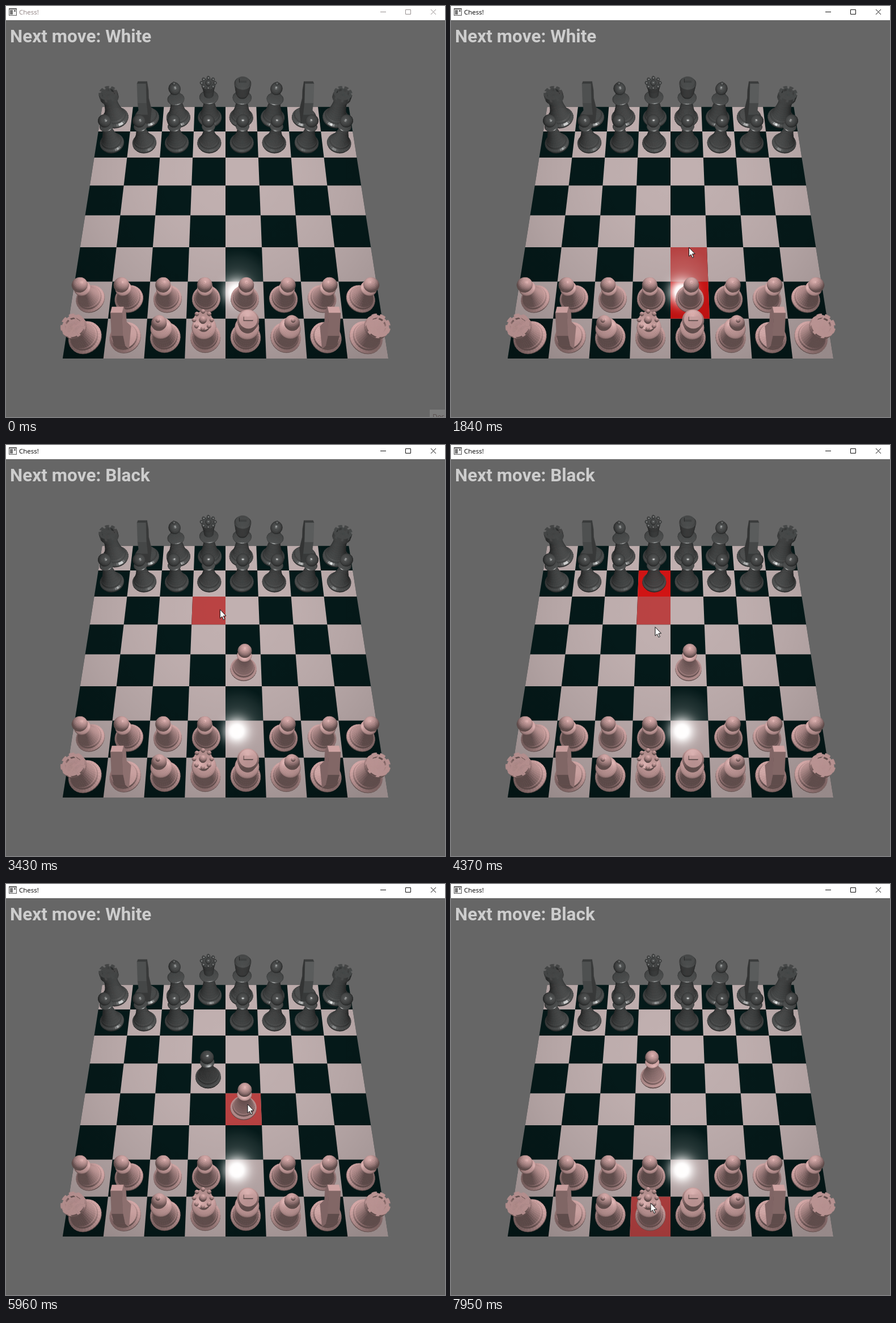
An HTML page with a canvas that plays this animation: 774 px wide and 724 px high, repeating every 8000 ms.

```html
<!DOCTYPE html>
<html lang="en">
<head>
<meta charset="utf-8">
<title>Chess!</title>
<style>
html, body { margin: 0; width: 100%; height: 100%; overflow: hidden; background: #666; }
canvas { display: block; width: 774px; height: 724px; }
</style>
</head>
<body>
<canvas id="stage" width="774" height="724"></canvas>
<script>
const W = 774, H = 724, LOOP = 8000, TAU = 2 * Math.PI;
const ctx = document.getElementById('stage').getContext('2d');

// Pitched camera with a 45 degree view; one unit is one square.
const F = 844, S = 0.882, C = 0.4712, CX = 387, CY = 374.5, DEPTH = 11.76, DROP = 3.435;
const EYE = [0, 12, -2.56], LAMP = [0.5, 6.5, 4];
const project = (x, h, z) => {
  const w = DEPTH + z * C - h * S;
  return [CX + F * x / w, CY + F * (DROP - z * S - h * C) / w];
};

const sub = (a, b) => a.map((v, i) => v - b[i]);
const dot = (a, b) => a.reduce((s, v, i) => s + v * b[i], 0);
const unit = a => { const l = Math.hypot(...a) || 1; return a.map(v => v / l); };
const mix = (a, b, k) => a.map((v, i) => v + (b[i] - v) * k);
const clamp = v => Math.max(0, Math.min(1, v));
const range = n => [...Array(n).keys()];

const WHITE = { rgb: [212, 168, 167], amb: 0.45, spec: 26 };
const BLACK = { rgb: [80, 82, 82], amb: 0.5, spec: 150 };

function trace(g, pts) {
  g.beginPath();
  pts.forEach(p => g.lineTo(p[0], p[1]));
  g.closePath();
}

function face(g, pts, normal, mat) {
  const mid = range(3).map(i => pts.reduce((s, p) => s + p[i], 0) / pts.length);
  const n = unit(normal), e = unit(sub(EYE, mid)), l = unit(sub(LAMP, mid));
  if (dot(n, e) <= 0) return;
  const half = unit(e.map((v, i) => v + l[i]));
  const lit = mat.amb + (1 - mat.amb) * Math.max(0, dot(n, l));
  const shine = mat.spec * Math.max(0, dot(n, half)) ** 90;
  g.fillStyle = g.strokeStyle = `rgb(${mat.rgb.map(c => Math.min(255, Math.round(c * lit + shine)))})`;
  g.lineWidth = 0.6;
  trace(g, pts.map(p => project(...p)));
  g.fill();
  g.stroke();
}

// Surface of revolution; profile is a list of [radius, height].
function lathe(g, x, z, profile, mat, n = 32, keep = () => true) {
  const order = range(n).filter(keep)
    .sort((a, b) => Math.sin((b + 0.5) * TAU / n) - Math.sin((a + 0.5) * TAU / n));
  for (let i = 1; i < profile.length; i++) {
    const [r0, h0] = profile[i - 1], [r1, h1] = profile[i];
    for (const k of order) {
      const a = k * TAU / n, b = a + TAU / n, m = (a + b) / 2;
      const at = (r, h, q) => [x + r * Math.cos(q), h, z + r * Math.sin(q)];
      face(g, [at(r0, h0, a), at(r0, h0, b), at(r1, h1, b), at(r1, h1, a)],
        [(h1 - h0) * Math.cos(m), r0 - r1, (h1 - h0) * Math.sin(m)], mat);
    }
  }
}

const ball = (r, h, tall = 1, n = 14) => range(n + 1).map(i => {
  const a = Math.PI * (i / n - 0.5);
  return [r * Math.cos(a), h + r * tall * Math.sin(a)];
});

const foot = r => [[r * 0.93, 0], [r, 0.05], [r, 0.1], [r * 0.84, 0.15], [r * 0.8, 0.22]];

// Foot with a stem that narrows quadratically up to the given height.
const body = (r, top, neck) => foot(r).concat(range(9).map(i => {
  const k = i / 8;
  return [neck + (r * 0.74 - neck) * (1 - k) ** 2, 0.25 + (top - 0.25) * k];
}));

// Upright slab: an outline of [forward, height] given thickness across x.
function extrude(g, x, z, outline, half, mat) {
  const pts = outline.map(([u, h]) => [h, z + u]);
  const far = ([p, q]) => (p[1] + q[1]) * C - (p[0] + q[0]) * S;
  pts.map((p, i) => [p, pts[(i + 1) % pts.length]])
    .sort((a, b) => far(b) - far(a))
    .forEach(([p, q]) => face(g,
      [[x - half, ...p], [x + half, ...p], [x + half, ...q], [x - half, ...q]],
      [0, q[1] - p[1], p[0] - q[0]], mat));
  const side = x < 0 ? 1 : -1;
  face(g, pts.map(p => [x + side * half, ...p]), [side, 0, 0], mat);
}

const HORSE = [[-0.3, 0.16], [-0.33, 0.6], [-0.18, 0.95], [0.25, 1.3], [0.42, 1.22], [0.38, 0.9], [0.2, 0.75], [0.26, 0.16]];
const CROSS = [[-0.035, 1.65], [-0.035, 1.73], [0.035, 1.73], [0.035, 1.65]];

const draw = {
  pawn(turn) {
    turn(body(0.36, 0.95, 0.12));
    turn(ball(0.19, 0.86, 0.25));
    turn(ball(0.177, 1.11));
  },
  rook(turn) {
    const r = 0.27, inner = 0.18, floor = 1.08, top = 1.18, tooth = k => k % 5 < 3;
    turn([...body(0.4, 0.9, 0.19), [r, 0.97], [r, floor], [0, floor]]);
    turn([[inner, top], [inner, floor]], 40, tooth);
    turn([[r, floor], [r, top], [inner, top]], 40, tooth);
  },
  knight(turn, slab) {
    turn([...foot(0.38), [0, 0.26]]);
    slab(HORSE, 0.135);
  },
  bishop(turn) {
    turn(body(0.37, 1.2, 0.13));
    turn(ball(0.25, 0.92, 0.22));
    turn(ball(0.168, 1.36, 1.1));
    turn(ball(0.045, 1.57, 1, 6), 14);
  },
  queen(turn, slab, at) {
    turn(body(0.37, 1.05, 0.14));
    turn(ball(0.28, 1, 0.2));
    turn([[0.13, 1.1], [0.16, 1.35], [0.21, 1.56], [0, 1.53]]);
    turn(ball(0.08, 1.6, 1, 8), 18);
    range(8).map(k => [Math.cos(k * TAU / 8) * 0.195, Math.sin(k * TAU / 8) * 0.195])
      .sort((a, b) => b[1] - a[1])
      .forEach(([dx, dz]) => at(dx, dz)(ball(0.045, 1.6, 1, 6), 12));
  },
  king(turn, slab) {
    turn(body(0.37, 1.05, 0.15));
    turn(ball(0.28, 0.98, 0.2));
    turn([[0.14, 1.08], [0.19, 1.2], [0.24, 1.58], [0.2, 1.64], [0, 1.66]]);
    slab(CROSS, 0.1);
  }
};

function put(g, kind, [c, r], mat) {
  const x = c - 3.5, z = r + 0.5;
  const at = (dx, dz) => (profile, n, keep) => lathe(g, x + dx, z + dz, profile, mat, n, keep);
  draw[kind](at(0, 0), (outline, half) => extrude(g, x, z, outline, half, mat), at);
}

function layer(paint) {
  const cv = document.createElement('canvas');
  cv.width = W;
  cv.height = H;
  paint(cv.getContext('2d'));
  return cv;
}
const RANK = ['rook', 'knight', 'bishop', 'queen', 'king', 'bishop', 'knight', 'rook'];
const pieces = (g, row, mat) => RANK.forEach((k, c) => put(g, k, [c, row], mat));
const pawns = (g, row, mat, skip) =>
  range(8).filter(c => c !== skip).forEach(c => put(g, 'pawn', [c, row], mat));
const farSide = layer(g => { pieces(g, 7, BLACK); pawns(g, 6, BLACK, 3); });
const nearSide = layer(g => { pawns(g, 1, WHITE, 4); pieces(g, 0, WHITE); });

// Moves: pick time, drop time, from, to, length of the slide.
const MOVES = [
  { pick: 1560, drop: 2330, from: [4, 1], to: [4, 3], len: 230 },
  { pick: 3970, drop: 4970, from: [3, 6], to: [3, 4], len: 230 },
  { pick: 6220, drop: 7240, from: [4, 3], to: [3, 4], len: 190 }
];
const slide = (m, t) => mix(m.from, m.to, clamp((t - m.drop + 10) / m.len));

// Pointer: leave time, arrive time, resting point.
const ENTER = 70, START = [768, 720];
const STOPS = [
  [ENTER, 410, 486, 515], [680, 1090, 421, 499], [1560, 2050, 419, 397], [3080, 3710, 360, 245],
  [3970, 4510, 360, 332], [5150, 5560, 424, 440], [5560, 5960, 426, 388],
  [6220, 6780, 367, 360], [7400, 7950, 352, 562]
];
function pointer(t) {
  if (t < ENTER) return null;
  return STOPS.reduce((p, [a, b, x, y]) =>
    mix(p, [x, y], 1 - (1 - clamp((t - a) / (b - a))) ** 1.5), START);
}

function squareAt(p) {
  if (!p) return null;
  const v = (p[1] - CY) / F, z = (DROP - v * DEPTH) / (S + v * C);
  const c = Math.floor((p[0] - CX) * (DEPTH + z * C) / F + 4), r = Math.floor(z);
  return Math.min(c, r) >= 0 && Math.max(c, r) < 8 ? [c, r] : null;
}

function area([c, r], size, fill) {
  trace(ctx, [[0, 0], [size, 0], [size, size], [0, size]].map(([x, z]) => project(c + x - 4, 0, r + z)));
  ctx.fillStyle = fill;
  ctx.fill();
}
function radial(x, y, r, rgb, alpha) {
  const g = ctx.createRadialGradient(x, y, 0, x, y, r);
  for (let i = 0; i <= 16; i++) g.addColorStop(i / 16, `rgba(${rgb},${clamp(alpha(i / 16))})`);
  return g;
}
const shadow = radial(395, 290, 400, '0,0,0', k => 0.22 * k * k);
const glare = radial(407, 504, 48, '255,252,251', k => 1.35 * Math.exp(-((2.3 * k) ** 2)) * (1 - k ** 4));
const sheen = radial(408, 492, 66, '255,250,245', k => 0.26 * (1 - k));

function board(t) {
  area([0, 0], 8, '#051a1a');
  for (let i = 0; i < 64; i++) {
    const c = i % 8, r = i >> 3;
    if ((c + r) % 2) area([c, r], 1, '#c1b0b0');
  }
  const over = squareAt(pointer(t - 60));
  if (over) area(over, 1, '#ba4343');
  for (const m of MOVES) if (t >= m.pick && t < m.drop) area(m.from, 1, '#d11414');
  area([0, 0], 8, shadow);

  ctx.globalCompositeOperation = 'screen';
  ctx.fillStyle = glare;
  ctx.fillRect(350, 450, 120, 110);
  area([4, 2], 1, sheen);
  ctx.globalCompositeOperation = 'source-over';
}

function box(color, ...rect) {
  ctx.fillStyle = color;
  ctx.fillRect(...rect);
}
function label(text, x, y, color, font) {
  ctx.fillStyle = color;
  ctx.font = font;
  ctx.fillText(text, x, y);
}
const SMALL = '"Open Sans", "Noto Sans", sans-serif';

function titleBar(active) {
  box('#fff', 0, 0, W, 25);
  box('#5c5c5c', 5, 4, 14, 13);
  box('#f4f4f4', 6, 6, 12, 10);
  box('#777', 7, 7, 5, 8);
  box('#777', 14, 7, 3, 3);
  label('Chess!', 23, 15, active ? '#000' : '#8d7f7f', '11.5px ' + SMALL);
  ctx.strokeStyle = active ? '#111' : '#969090';
  ctx.lineWidth = 1;
  ctx.beginPath();
  ctx.moveTo(660, 10.5);
  ctx.lineTo(670, 10.5);
  ctx.rect(704.5, 6.5, 9, 8);
  ctx.moveTo(749, 6);
  ctx.lineTo(758, 15);
  ctx.moveTo(758, 6);
  ctx.lineTo(749, 15);
  ctx.stroke();
}

function tooltip(t) {
  ctx.globalAlpha = clamp(1 - (t - 70) / 230);
  box('#7b7b7b', 747, 711, 27, 13);
  label('Desktop', 752, 728, '#5b5050', '12px ' + SMALL);
  ctx.globalAlpha = 1;
}

const ARROW = [[0, 0], [0, 15.5], [3.5, 12.3], [6, 18], [8.4, 17], [5.9, 11.4], [10.6, 11.2]];
function cursor(p) {
  if (!p) return;
  trace(ctx, ARROW.map(([x, y]) => [p[0] + x, p[1] + y]));
  ctx.fillStyle = '#fff';
  ctx.fill();
  ctx.strokeStyle = '#111';
  ctx.lineWidth = 1;
  ctx.stroke();
}

function render(t) {
  const [open, reply, take] = MOVES;
  box('#666', 0, 0, W, H);
  board(t);
  ctx.drawImage(farSide, 0, 0);
  if (t < take.drop) put(ctx, 'pawn', slide(reply, t), BLACK);
  put(ctx, 'pawn', slide(t < take.pick ? open : take, t), WHITE);
  ctx.drawImage(nearSide, 0, 0);

  const played = MOVES.filter(m => t >= m.drop).length;
  label('Next move: ' + (played % 2 ? 'Black' : 'White'), 7, 64, '#cdcdcd',
    '700 31.5px Roboto, "Open Sans", sans-serif');
  tooltip(t);
  titleBar(t >= 1290);
  cursor(pointer(t));
}

function tick() {
  render(performance.now() % LOOP);
  requestAnimationFrame(tick);
}
tick();
</script>
</body>
</html>
```
